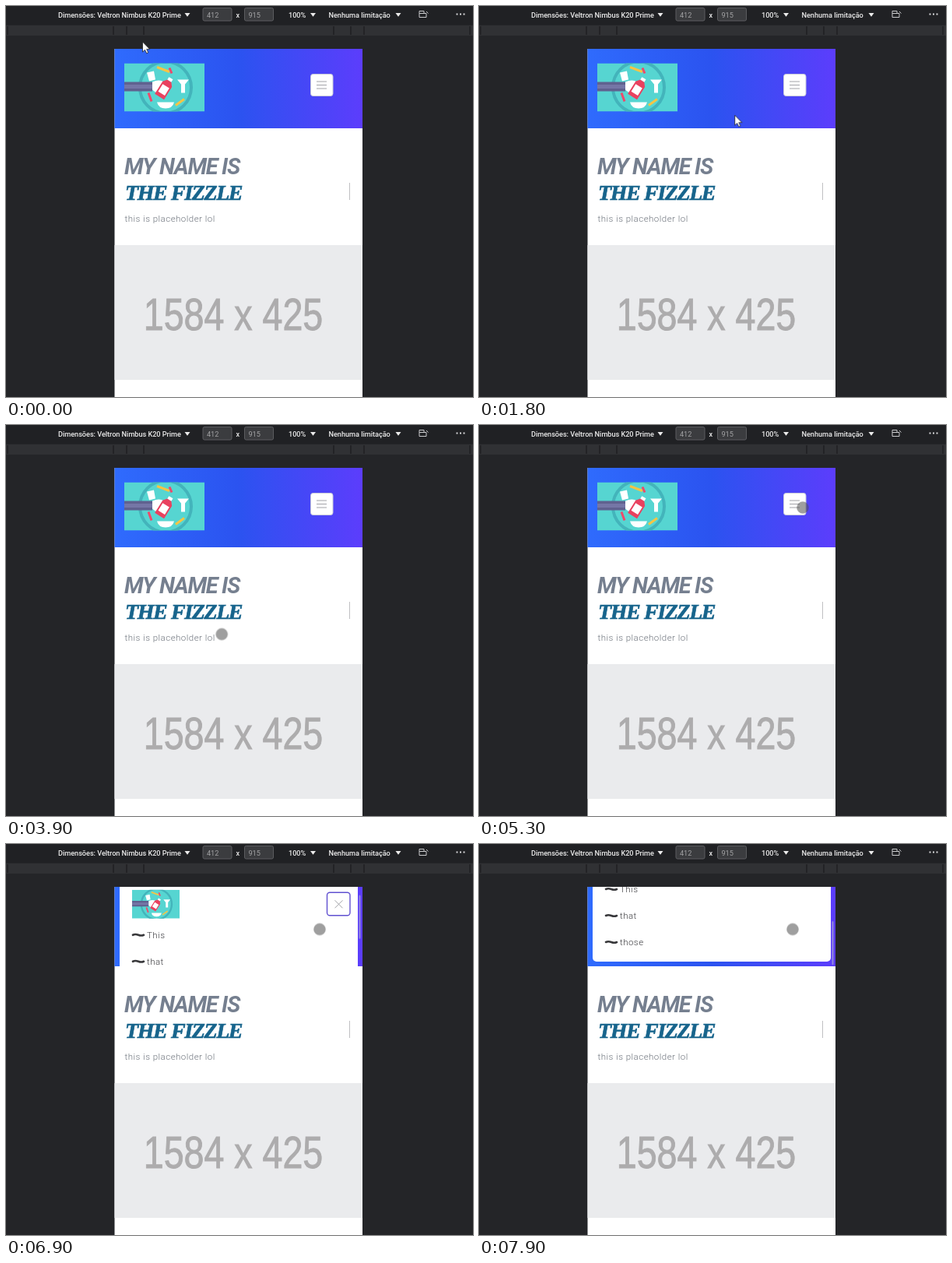
Animation of 600x502 px, one loop 8 s. Source, as an HTML page:

```html
<!DOCTYPE html>
<html lang="pt">
<head>
<meta charset="utf-8">
<title>Responsive menu</title>
<style>
  html, body { margin: 0; width: 100%; height: 100%; overflow: hidden; background: #242528; }
  svg { display: block; }
  text { font-family: Roboto, sans-serif; }
  .bar { font-size: 9.2px; font-weight: 500; letter-spacing: -.05px; fill: #ececec; }
  .dim { font-weight: 400; fill: #a2a2a4; }
  .copy { font-size: 11.5px; font-weight: 300; letter-spacing: .47px; fill: #6c727b; }
  .link { fill: #3a3a3e; }
  .title { font-size: 29px; font-weight: 700; font-style: italic; letter-spacing: -1.3px; fill: #757f8f; }
  .name { font: italic bold 28px "Liberation Serif", serif; letter-spacing: -1.4px; fill: #17648c; stroke: #17648c; stroke-width: .7px; }
  .size { font: 57.5px "Liberation Sans", Arial, sans-serif; fill: #adacad; stroke: #adacad; text-anchor: middle; }
  .icon { fill: none; stroke: #a2a3a8; }
  #menu { transform-origin: 452px 61px; }
</style>
</head>
<body>
<svg width="600" height="502" viewBox="0 0 600 502">
  <defs>
    <linearGradient id="sky">
      <stop offset="0" stop-color="#2f6bfd"/>
      <stop offset=".5" stop-color="#2b53f0"/>
      <stop offset="1" stop-color="#5c3dfc"/>
    </linearGradient>
    <clipPath id="head"><rect x="139.5" y="55" width="318.5" height="102"/></clipPath>
    <symbol id="art" viewBox="0 0 103 62">
      <rect width="103" height="62" fill="#56d5d1"/>
      <circle cx="53" cy="31" r="33" fill="none" stroke="#43b4bb" stroke-width="4"/>
      <path d="M0 24h36v12H0z" fill="#60618f"/>
      <path d="M0 30h36" stroke="#7576a6" stroke-width="5"/>
      <path d="M42 5l16 6M66 54l11-8" stroke="#f5c545" stroke-width="3"/>
      <path d="M31 38l4 11M58 6l3 7" stroke="#ee4a6b" stroke-width="3"/>
      <g fill="#fff">
        <path d="M29 12l9-2 2 11-8 2z"/>
        <path d="M68 21h15l-5 6v11h-5V27z"/>
        <path d="M42 50h22q-2 8-11 8t-11-8z"/>
        <path d="M36 24q9-4 15 0v16q-9 0-15-6z"/>
      </g>
      <g transform="translate(52 32) rotate(32)">
        <path d="M-7-6l4-5h6l4 5v19H-7z" fill="#e9415f"/>
        <path d="M-3-15h6v4h-6zM-5-3H5v11H-5z" fill="#fff"/>
      </g>
    </symbol>
    <path id="caret" d="M-3.500 0h7L0 4.800z" fill="#ececec"/>
    <path id="wave" d="M0 0q3-1.600 7 0t7 0" fill="none" stroke="#38383b" stroke-width="2.600" stroke-linecap="round"/>
  </defs>

  <!-- device toolbar -->
  <rect width="600" height="24" fill="#202124"/>
  <rect y="25" width="600" height="13" fill="#303134"/>
  <g id="ruler" stroke="#1e1f21" stroke-width="1.400"></g>
  <g id="selects"></g>
  <g id="inputs"></g>
  <text class="bar" x="295.500" y="15" font-size="11">x</text>
  <path class="icon" d="M537 9V6.500h-6v8h9v-5h-9M540 7l2.500 2.500" style="stroke: #c9cacc"/>
  <path d="M578.500 10.500H592" stroke="#d5d6d8" stroke-width="1.800" stroke-dasharray="2 2.500"/>

  <!-- page -->
  <rect x="139.500" y="55" width="318.500" height="447" fill="#fff"/>
  <rect x="139.500" y="55" width="318.500" height="102" fill="url(#sky)"/>
  <use href="#art" x="152" y="73.500" width="103" height="62"/>
  <rect x="391.500" y="87.500" width="28.500" height="28" rx="3" fill="#fff" stroke="#c6c8da"/>
  <path class="icon" d="M399 97h13m-13 4.500h13m-13 4.500h13"/>
  <text class="title" x="152" y="216">MY NAME IS</text>
  <text class="name" x="153" y="248.500">THE FIZZLE</text>
  <path d="M441.500 227v22" stroke="#c0c0c2"/>
  <text class="copy" x="152.500" y="277">this is placeholder lol</text>
  <rect x="139.500" y="307" width="318.500" height="173" fill="#eaebed"/>
  <!-- the wide placeholder is squeezed like its picture -->
  <g transform="translate(292 416) scale(.81 1)"><text class="size">1584 x 425</text></g>

  <!-- menu -->
  <g clip-path="url(#head)">
    <g id="menu" opacity="0">
      <g id="sheet">
        <rect x="146" y="61" width="306" height="164" rx="5" fill="#fff"/>
        <use href="#art" x="162" y="74" width="61" height="37"/>
        <rect x="412.500" y="77.500" width="29.500" height="29.500" rx="3.500" fill="#fff" stroke="#6050d0" stroke-width="1.400"/>
        <path class="icon" d="M422.500 87.500l10 10m0-10l-10 10"/>
        <g id="links"></g>
      </g>
      <rect id="thumb" x="453.500" y="57" width="2" height="56" rx="1" fill="#a9a6d6" opacity=".75"/>
    </g>
  </g>

  <!-- pointer -->
  <g id="pointer">
    <path id="arrow" d="M.5 0v13l3-2.700 2.200 4.500 2-1-2-4.400h4z" fill="#fff" stroke="#222" stroke-width=".8"/>
    <circle id="touch" r="7.600" fill="#505050" stroke="#505050" stroke-opacity=".35" opacity="0"/>
  </g>
</svg>
<script>
const LOOP = 8000;
const $ = id => document.getElementById(id);
const fill = (id, items, draw) => { $(id).innerHTML = items.map(draw).join(''); };

// ruler marks mirror each other around the page centre
fill('ruler', [122, 144, 161, 297], d => `<path d="M${299 - d} 26v11M${299 + d} 26v11"/>`);
fill('selects', [
  ['Dimensões: Veltron Nimbus K20 Prime', 67, 233],
  ['100%', 363, 394.5],
  ['Nenhuma limitação', 414.5, 504]
], ([label, x, caret]) =>
  `<text class="bar" x="${x}" y="14.500">${label}</text><use href="#caret" x="${caret}" y="9"/>`);
fill('inputs', ['412', '915'], (value, i) => {
  const x = 253 + i * 53.5;
  return `<rect x="${x}" y="2.500" width="37" height="16.500" rx="2" fill="#3b3c3f" stroke="#5c5d60"/>` +
    `<text class="bar dim" x="${x + 5}" y="14.500">${value}</text>`;
});
fill('links', ['This', 'that', 'those'], (word, i) => {
  const y = 132 + i * 34;
  return `<use href="#wave" x="163" y="${y}"/><text class="copy link" x="181" y="${y + 4}">${word}</text>`;
});

// steps: [time, ...values]; the first and last pose hold to the ends of the loop
function play(id, steps, pose, easing = 'ease-in-out') {
  const first = steps[0].slice(1), last = steps.at(-1).slice(1);
  const frames = [[0, ...first], ...steps, [LOOP, ...last]]
    .map(([t, ...v]) => ({ offset: t / LOOP, easing, ...pose(...v) }));
  $(id).animate(frames, { duration: LOOP, iterations: Infinity });
}
const move = (x, y) => ({ transform: `translate(${x}px, ${y}px)` });
const fade = opacity => ({ opacity });

// logo, page, down to the picture, then up to the button
const logo = [178, 85], page = [434, 179], picture = [235, 318], button = [416, 106], rest = [403, 109.5];
play('pointer', [
  [100, 175, 46], [700, ...logo], [2700, ...page], [2900, ...page],
  [3600, ...picture], [4500, ...button], [6200, ...button], [6500, ...rest]
], move);

const swap = 3300;
play('arrow', [[0, 1], [swap, 0]], fade, 'step-end');
play('touch', [[0, 0], [swap, .55]], fade, 'step-end');

play('menu', [[5500, 0, .95], [5750, 1, 1]],
  (opacity, s) => ({ opacity, transform: `scale(${s})` }), 'ease-out');

const scroll = [[6600, 0], [7300, 40], [7500, 40], [7900, 74]];
play('sheet', scroll, y => move(0, -y));
play('thumb', scroll, y => move(0, y * .57));
</script>
</body>
</html>
```
